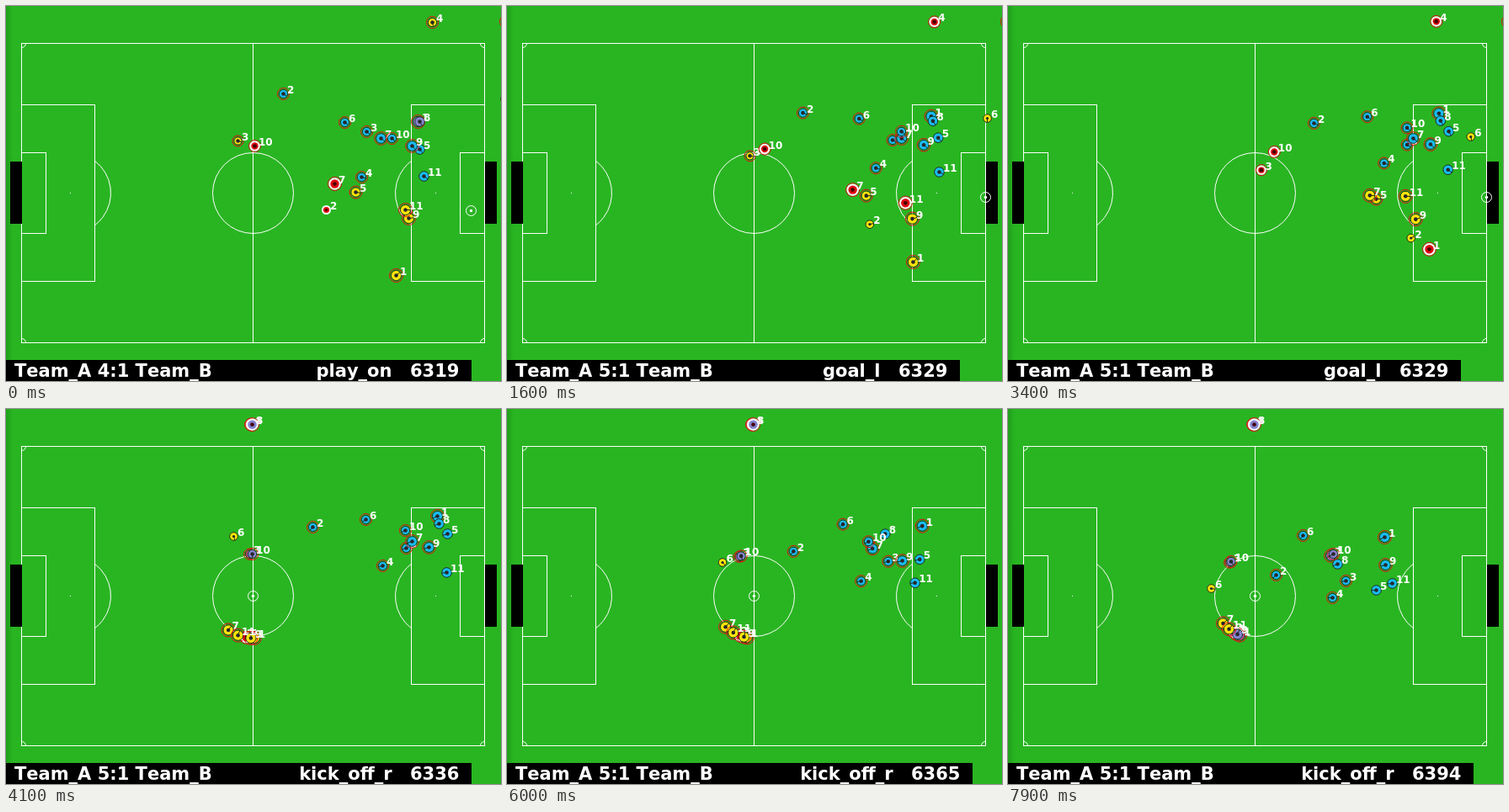
An HTML page with a canvas for the animation above (8 s loop, 588 by 446 pixels).

```html
<!DOCTYPE html>
<html lang="en">
<head>
<meta charset="utf-8">
<title>Soccer match</title>
<style>
  html, body { margin: 0; width: 588px; height: 446px; overflow: hidden; background: #29b522; }
  canvas { display: block; }
</style>
</head>
<body>
<canvas id="stage" width="588" height="446"></canvas>
<script>
const ctx = document.getElementById('stage').getContext('2d');
const LOOP = 8000, STEP = 100;
const GOAL = 600, RESTART = 3700;
const READY = 4100, TURN = 5200, END = 7900;
const FONT = '"DejaVu Sans", Verdana, sans-serif';
const YELLOW = '#ffe60a', CYAN = '#17bdf3', CLASH = '#8583d2', RED = '#e00a14';
const NEVER = [LOOP, 0], LATE = [RESTART, LOOP];

const mix = (a, b, k) => a + (b - a) * k;
const move = (p, q, k) => [mix(p[0], q[0], k), mix(p[1], q[1], k)];
const part = (t, a, b) => Math.min(1, Math.max(0, (t - a) / (b - a)));
const easeOut = k => 1 - (1 - k) ** 2;

// Ways of waiting for the kick-off
const bench = x => () => [x, 18];
const run = (from, to) => k => move(from, to, k);
// Held back by the centre circle; deg is measured from its left end and shrinks.
const circle = deg => k => {
  const a = Math.PI + deg * (1 - k * (deg > 0 ? 0.38 : 0.25)) * Math.PI / 180;
  return [293 + 50 * Math.cos(a), 222 + 50 * Math.sin(a)];
};

const players = [];

// Left team: steady run from a to b during play, then waiting.
function left(num, r, a, b, wait, kick = NEVER) {
  const place = t => {
    if (t >= RESTART) return wait(part(t, READY, END));
    const k = t / 2700;
    return move(a, b, k > 1 ? 1 + (k - 1) * 0.6 : k);
  };
  players.push({ num, r, place, kick, color: YELLOW, bare: r < 6 });
}

// Right team: settle from a to b, then advance by way of c to d.
function right(num, r, a, b, c, d) {
  const place = t =>
    t < READY ? move(a, b, easeOut(t / READY)) :
    t < TURN ? move(b, c, part(t, READY, TURN)) :
    move(c, d, part(t, TURN, END));
  players.push({ num, r, place, kick: NEVER, color: CYAN, bare: r < 6.5 });
}

left(1, 8, [463, 320], [495, 293], circle(-92), [2200, RESTART]);
left(2, 5, [380, 242], [465, 271], circle(-76), [0, 800]);
left(3, 6.5, [275, 160], [297, 190], circle(85), [2200, RESTART]);
left(4, 7, [506, 19], [508, 18], bench(290), [800, LOOP]);
left(5, 7.5, [415, 221], [434, 228], circle(-81), LATE);
left(6, 5, [592, 110], [555, 149], run([270, 151], [241, 213]));
left(7, 8, [390, 211], [424, 223], circle(-54), [0, 2100]);
left(8, 8, [594, 18], [594, 18], bench(292), LATE);
left(9, 8, [478, 252], [483, 253], circle(-87));
left(10, 7, [295, 166], [313, 172], circle(89), [0, RESTART]);
left(11, 8, [474, 242], [472, 228], circle(-69), [800, 2100]);

right(1, 8, [489, 137], [512, 127], [512, 133], [447, 152]);
right(2, 7, [329, 104], [364, 140], [349, 157], [318, 197]);
right(3, 7, [428, 149], [475, 165], [474, 171], [401, 204]);
right(4, 7, [422, 203], [447, 186], [435, 196], [385, 224]);
right(5, 6, [491, 170], [524, 148], [512, 163], [437, 215]);
right(6, 7, [402, 138], [427, 131], [419, 131], [350, 150]);
right(7, 7.8, [445, 157], [482, 157], [455, 162], [383, 174]);
right(8, 6, [491, 137], [514, 136], [473, 133], [391, 184]);
right(9, 7.8, [482, 166], [502, 164], [478, 178], [448, 185]);
right(10, 7, [458, 157], [474, 144], [447, 151], [386, 172]);
right(11, 6, [496, 202], [523, 194], [496, 206], [456, 207]);

function disc(x, y, r, color) {
  ctx.fillStyle = color;
  ctx.beginPath();
  ctx.arc(x, y, r, 0, 7);
  ctx.fill();
}

function ring(x, y, r, color, from = 0, to = Math.PI * 2) {
  ctx.strokeStyle = color;
  ctx.beginPath();
  ctx.arc(x, y, r, from, to);
  ctx.stroke();
}

function line(x1, y1, x2, y2) {
  ctx.beginPath();
  ctx.moveTo(x1, y1);
  ctx.lineTo(x2, y2);
  ctx.stroke();
}

function text(s, x, y, size, align = 'left') {
  ctx.font = `bold ${size}px ${FONT}`;
  ctx.fontKerning = 'none';
  ctx.textAlign = align;
  ctx.fillStyle = '#fff';
  ctx.fillText(s, x, y);
}

// One half of the pitch; side is -1 for left, 1 for right.
function drawHalf(side) {
  const edge = 293.5 + side * 275;
  ctx.strokeStyle = '#fff';
  ctx.strokeRect(edge, 117.5, -side * 87, 210);
  ctx.strokeRect(edge, 174.5, -side * 29, 96);
  const spot = edge - side * 58;
  const mid = side < 0 ? 0 : Math.PI, a = Math.acos(29 / 48);
  ring(spot, 222.5, 48, '#fff', mid - a, mid + a);
  const q = Math.PI / 2, turn = side < 0 ? 0 : q;
  ring(edge, 44.5, 5, '#fff', turn, turn + q);
  ring(edge, 400.5, 5, '#fff', -turn - q, -turn);
  ctx.fillStyle = '#fff';
  ctx.fillRect(spot - 0.5, 222, 1, 1);
  ctx.fillStyle = '#000';
  ctx.fillRect(side < 0 ? 5 : 569, 185, 14, 74);
}

function drawField() {
  ctx.fillStyle = '#29b522';
  ctx.fillRect(0, 0, 588, 446);
  const shade = ctx.createLinearGradient(0, 0, 8, 0);
  shade.addColorStop(0, 'rgba(20,130,20,.45)');
  shade.addColorStop(1, 'rgba(20,130,20,0)');
  ctx.fillStyle = shade;
  ctx.fillRect(0, 0, 8, 446);

  ctx.lineWidth = 1;
  ctx.strokeStyle = '#fff';
  ctx.strokeRect(18.5, 44.5, 550, 356);
  line(293.5, 44, 293.5, 401);
  ring(293.5, 222.5, 48, '#fff');
  drawHalf(-1);
  drawHalf(1);
}

function drawPlayer(p, ball, t) {
  const { x, y, r } = p;
  const kick = t >= p.kick[0] && t < p.kick[1];
  const fill = p.clash ? CLASH : kick ? RED : p.color;
  if (!p.bare) ring(x, y, r, RED);
  if (kick) {
    disc(x, y, Math.max(r - 0.8, 5.5), '#fff');
    disc(x, y, Math.max(r - 2.8, 3.6), fill);
  } else {
    const body = p.bare ? r - 0.2 : r - 1.9;
    disc(x, y, body, fill);
    ring(x, y, body, '#1c2a18');
    const a = Math.atan2(ball[1] - y, ball[0] - x);
    line(x, y, x + body * Math.cos(a), y + body * Math.sin(a));
  }
  disc(x, y, r < 6 ? 1.6 : 2.3, kick ? '#400' : '#26262a');
  text(p.num, x + 4.5, y - 0.5, 12);
}

function drawBall([x, y]) {
  ring(x, y, 6, '#fff');
  disc(x, y, 1.7, '#fff');
}

function drawBar(t) {
  const scored = t >= GOAL;
  const stopped = scored && t < RESTART;
  const mode = !scored ? 'play_on' : stopped ? 'goal_l' : 'kick_off_r';
  const count = t < RESTART ? 6319 + Math.min(t, GOAL) / 60 : 6330 + (t - RESTART) / 65.6;
  const end = stopped ? 538 : 553;
  ctx.fillStyle = '#000';
  ctx.fillRect(0, 421, end, 25);
  text(`Team_A ${scored ? 5 : 4}:1 Team_B`, 10, 441, 21);
  text(mode, end - 94.5, 441, 21, 'right');
  text(Math.floor(count), end - 73, 441, 21);
}

function draw(t) {
  const ball = t < RESTART
    ? move([552, 243], [568, 227], part(t, 0, GOAL))
    : [293, 222];
  for (const p of players) [p.x, p.y] = p.place(t);
  for (const p of players) {
    p.clash = players.some(o => o !== p && Math.hypot(o.x - p.x, o.y - p.y) < 3.7);
  }
  drawField();
  ctx.save();
  ctx.translate(0.5, 0.5);
  for (const p of players) drawPlayer(p, ball, t);
  drawBall(ball);
  ctx.restore();
  drawBar(t);
}

const start = performance.now();
function tick(now) {
  const t = Math.max(0, now - start) % LOOP;
  draw(Math.floor(t / STEP) * STEP);
  requestAnimationFrame(tick);
}
draw(0);
requestAnimationFrame(tick);
</script>
</body>
</html>
```
